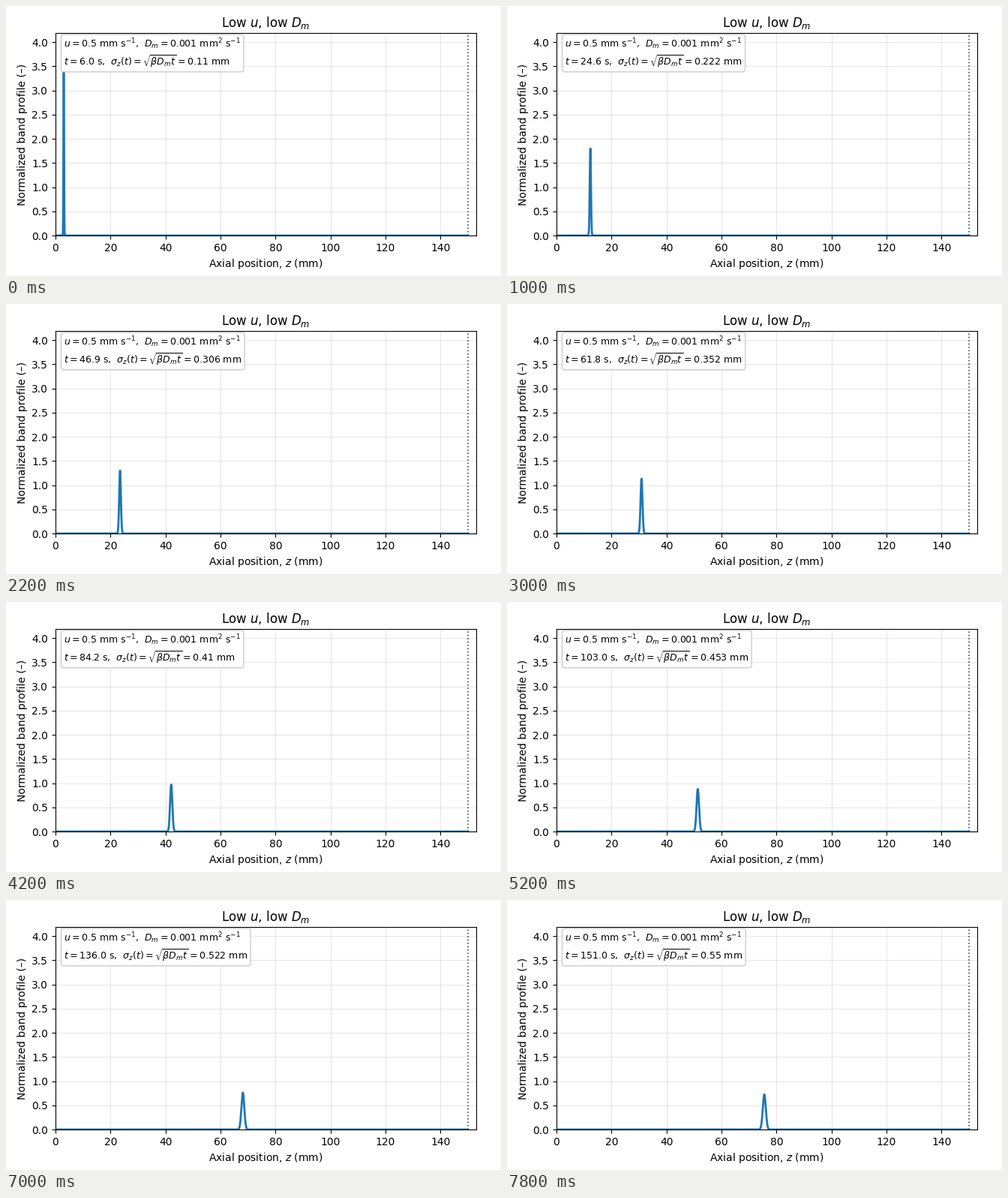
A matplotlib script that plays this animation: 660x360 px, repeating every 8 s.

```python
import numpy as np
import matplotlib.pyplot as plt
from matplotlib.animation import FuncAnimation

LENGTH = 150.0      # mm
U = 0.5             # mm/s
D_M = 0.001         # mm^2/s
BETA = 2.0
FRAMES = 40
INTERVAL = 200

t_end = LENGTH / U
times = np.linspace(0.02 * t_end, t_end, 80)[:FRAMES]
z = np.linspace(0, LENGTH, 2000)


def sigma(t):
    return np.sqrt(BETA * D_M * t)


def band(t):
    s = sigma(t)
    return np.exp(-0.5 * ((z - U * t) / s) ** 2) / (s * np.sqrt(2 * np.pi))


def sig3(value):
    return float(f"{value:.3g}")


def caption(t):
    return (
        rf"$u={U}$ mm s$^{{-1}}$,  $D_m={D_M}$ mm$^2$ s$^{{-1}}$" "\n"
        rf"$t={sig3(t)}$ s,  "
        rf"$\sigma_z(t)=\sqrt{{\beta D_m t}}={sig3(sigma(t))}$ mm"
    )


fig, ax = plt.subplots(figsize=(6.6, 3.6), dpi=100)
fig.subplots_adjust(left=0.1, right=0.95, bottom=0.15, top=0.9)

peak = 1 / (sigma(times[0]) * np.sqrt(2 * np.pi))
ax.set_xlim(0, 1.02 * LENGTH)
ax.set_ylim(0, 1.15 * peak)
ax.set_title("Low $u$, low $D_m$")
ax.set_xlabel("Axial position, $z$ (mm)")
ax.set_ylabel("Normalized band profile (–)")
ax.grid(alpha=0.3)
ax.axvline(LENGTH, color="k", ls=":", lw=1.2, alpha=0.7)

line, = ax.plot(z, band(times[0]), lw=2)
info = ax.text(
    0.02, 0.98, caption(times[0]), transform=ax.transAxes,
    ha="left", va="top", fontsize=9,
    bbox=dict(boxstyle="round", facecolor="white", edgecolor="0.8"),
)


def update(i):
    t = times[i]
    line.set_ydata(band(t))
    info.set_text(caption(t))
    return line, info


anim = FuncAnimation(fig, update, frames=FRAMES, interval=INTERVAL,
                     repeat=True, repeat_delay=0)
plt.show()
```
